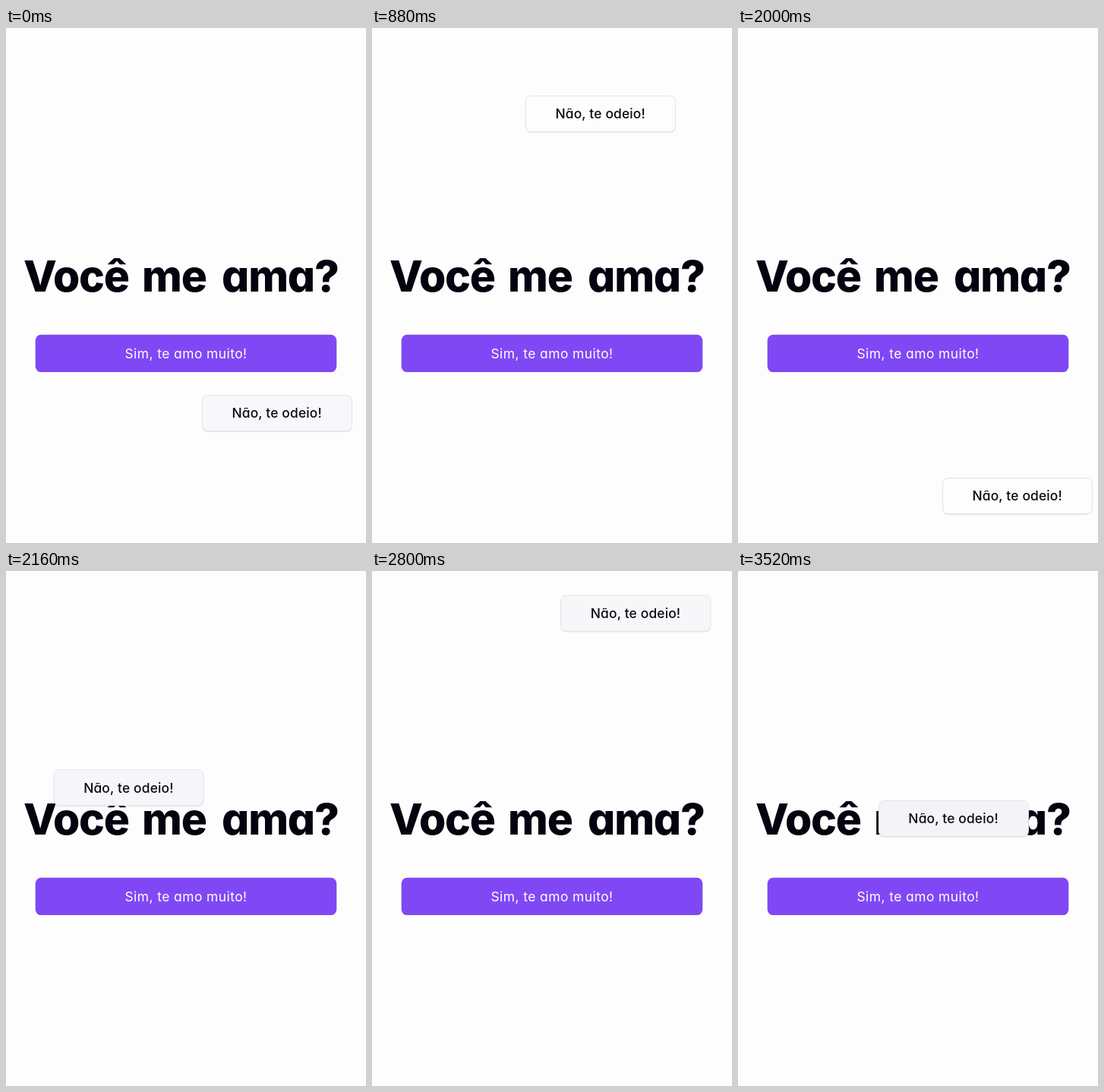
These frames come from a looping animation (474x678 px, 3600 ms). An HTML page:

```html
<!DOCTYPE html>
<html lang="pt">
<head>
<meta charset="utf-8">
<title>Você me ama?</title>
<style>
  html, body { margin: 0; width: 100%; height: 100%; overflow: hidden; background: #fdfdfd; }
  svg { display: block; width: 100vw; height: 100vh; }
  text { font-family: Inter, "Open Sans", sans-serif; font-feature-settings: "cv11"; }
  .title { font-size: 57px; font-weight: 800; font-optical-sizing: none; letter-spacing: -1.2px; fill: #03030f; }
  .label { font-size: 17.4px; text-anchor: middle; }
  .yes { font-weight: 430; letter-spacing: .45px; fill: #fff; }
  .no { font-weight: 500; letter-spacing: .15px; fill: #0a0a14; }
</style>
</head>
<body>
<svg viewBox="0 0 474 678">
  <rect width="474" height="678" fill="#fdfdfd"/>
  <text class="title" y="347"><tspan x="23">Você</tspan><tspan x="179">me</tspan><tspan x="284">ama?</tspan></text>
  <rect x="38.7" y="403.8" width="396.6" height="49.3" rx="7.5" fill="#8048f4"/>
  <text class="label yes" x="237" y="434.5">Sim, te amo muito!</text>
  <g id="no">
    <rect x="0" y="1.2" width="198" height="48" rx="7.5" fill="#14142b" opacity=".07"/>
    <rect id="face" x=".5" y=".5" width="197" height="47" rx="7" stroke="#e4e4ea"/>
    <text class="label no" x="98.7" y="30.3">Não, te odeio!</text>
  </g>
</svg>
<script>
const LOOP = 3600, STEP = 80, MOVE = 300;
const START = [42.5, 631];
// start time and landing point of each dodge
const moves = [
  [-180, 288.5, 462],
  [515, 202, 89],
  [1345, 269, 592],
  [2010, 3, 165.5],
  [2635, 298, 4.5],
  [3265, 183.4, 306]
];
const REHOVER = 2890;
const REST = [253, 253, 254], HOVER = [243, 243, 248];

const no = document.getElementById("no");
const face = document.getElementById("face");
const clamp = v => Math.min(1, Math.max(0, v));
const mix = (a, b, k) => a + (b - a) * k;

// cubic-bezier(.4, 0, .2, 1)
function ease(u) {
  if (u <= 0 || u >= 1) return clamp(u);
  let lo = 0, hi = 1, s = .5;
  for (let i = 0; i < 24; i++) {
    s = (lo + hi) / 2;
    const r = 1 - s;
    if (1.2 * r * r * s + .6 * r * s * s + s * s * s < u) lo = s; else hi = s;
  }
  return s * s * (3 - 2 * s);
}

// the hover tint comes up as a dodge begins and fades as it lands
const bump = age => Math.min(clamp((age - 30) / 75), clamp((255 - age) / 150));

function draw(t) {
  let [x, y] = START, tint = 0;
  for (const [at, tx, ty] of moves) {
    const k = ease((t - at) / MOVE);
    x = mix(x, tx, k);
    y = mix(y, ty, k);
    tint = Math.max(tint, bump(t - at));
  }
  tint = Math.max(tint, clamp((t - REHOVER) / 150));
  no.setAttribute("transform", `translate(${x.toFixed(2)} ${y.toFixed(2)})`);
  face.setAttribute("fill", `rgb(${REST.map((c, i) => Math.round(mix(c, HOVER[i], tint)))})`);
}

const begin = performance.now();
function tick() {
  const t = (performance.now() - begin) % LOOP;
  draw(Math.floor(t / STEP) * STEP);
  requestAnimationFrame(tick);
}
tick();
</script>
</body>
</html>
```
